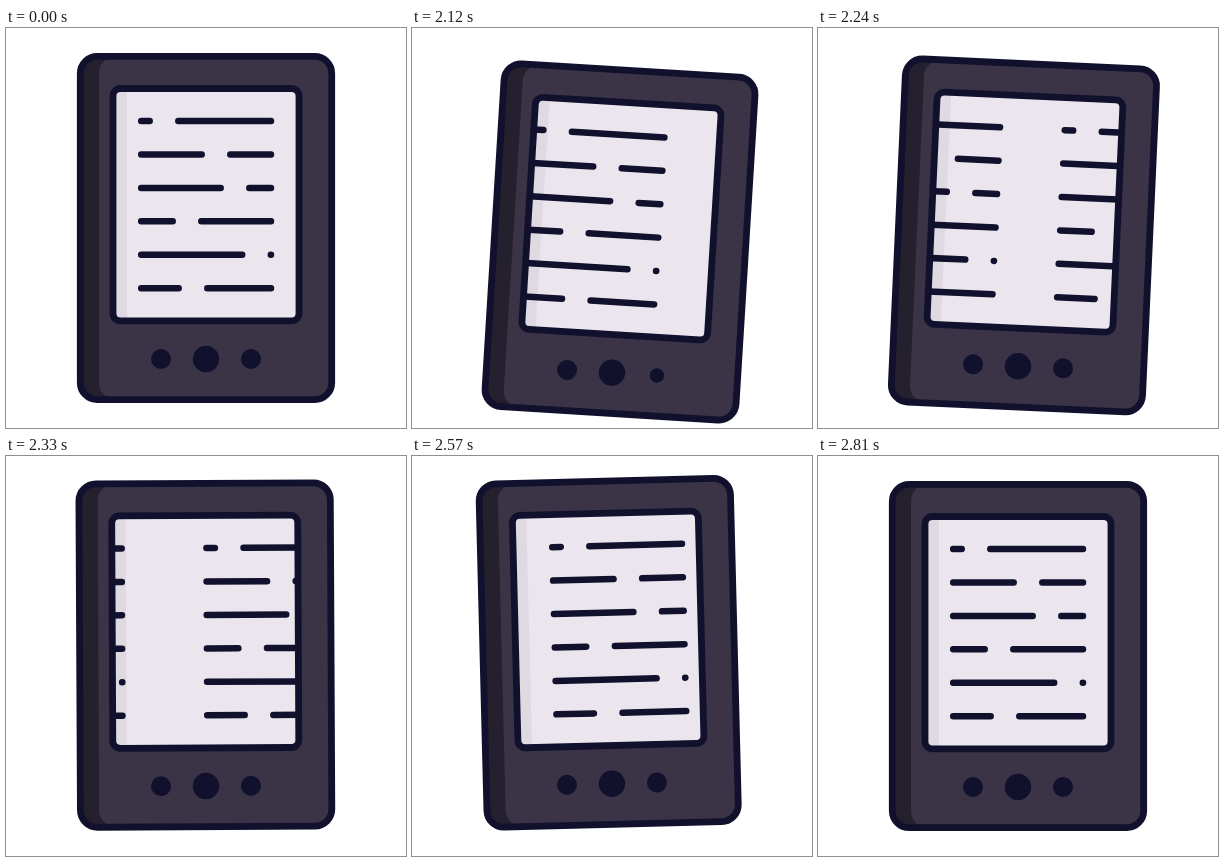
An HTML page that plays this animation: 400 by 400 pixels, repeating every 2.84 s.

```html
<!DOCTYPE html>
<html lang="en">
<head>
<meta charset="utf-8">
<title>E-reader page turn</title>
<style>
  html, body { margin: 0; width: 100%; height: 100%; overflow: hidden; background: #fff; }
  svg { display: block; width: 100%; height: 100%; }
  .ink { fill: #11112e; }
  .line { fill: none; stroke: #11112e; stroke-width: 6.5; stroke-linecap: round; }
  .frame { stroke-width: 6.8; }
</style>
</head>
<body>
<svg viewBox="0 0 400 400">
  <clipPath id="screen"><rect x="107" y="60.5" width="186" height="232.4" rx="7.5"/></clipPath>
  <g id="device">
    <rect x="74.3" y="28.3" width="251.4" height="343.4" rx="17" fill="#25202e"/>
    <rect x="93" y="28.3" width="232.7" height="343.4" rx="17" fill="#3a3446"/>
    <rect class="line frame" x="74.3" y="28.3" width="251.4" height="343.4" rx="17"/>
    <g clip-path="url(#screen)">
      <path d="M107 60h186v234H107z" fill="#ebe6ee"/>
      <path d="M107 60h14v234h-14z" fill="#dfd9e2"/>
      <path id="oldPage" class="line"/>
      <path id="newPage" class="line"/>
    </g>
    <rect class="line frame" x="107" y="60.5" width="186" height="232.4" rx="7.5"/>
    <circle class="ink" cx="155" cy="331" r="10"/>
    <circle class="ink" cx="200" cy="331" r="13.2"/>
    <circle class="ink" id="button" cx="245" cy="331" r="10"/>
  </g>
</svg>
<script>
const LOOP = 2840, START = 2000, STEP = 30;
const $ = id => document.getElementById(id);

// Progress 0..1 of t between two times; a power below 1 starts faster.
const part = (t, from, to) => Math.min(1, Math.max(0, (t - from) / (to - from)));
const ease = (t, from, to, power = 1) =>
  (1 - Math.cos(Math.PI * part(t, from, to) ** power)) / 2;

// Two rows of ink per line, parted by a gap after each given x.
const text = [147, 199, 218, 170, 239.5, 176].map((end, i) => {
  const y = 93 + i * 33.45;
  return `M135.2 ${y}H${end - 3.3}M${end + 25.3} ${y}H265`;
}).join("");
$("oldPage").setAttribute("d", text);
$("newPage").setAttribute("d", text);

function draw(now) {
  const t = Math.floor((now % LOOP - START) / STEP) * STEP;

  // The tap pushes the device down and tilts it; it swings past rest and settles.
  const angle = 4 * ease(t, 0, 155) - 6 * ease(t, 155, 435, .95) + 2 * ease(t, 435, 815);
  const drop = 14.3 * ease(t, 0, 145, .75) - 19 * ease(t, 145, 430, .8) + 4.7 * ease(t, 430, 810);
  const press = 3.7 * (ease(t, 0, 70, .75) - ease(t, 70, 220));

  const oldX = -200 * ease(t, 0, 500);
  const newX = t < 0 ? 200 : 200 * (1 - part(t, 50, 760)) ** 2.2;

  $("device").setAttribute("transform", `translate(0 ${drop}) rotate(${angle} 200 331)`);
  $("button").setAttribute("r", 10 - press);
  $("oldPage").setAttribute("transform", `translate(${oldX})`);
  $("newPage").setAttribute("transform", `translate(${newX})`);
}

const begin = performance.now();
function tick() {
  draw(performance.now() - begin);
  requestAnimationFrame(tick);
}
tick();
</script>
</body>
</html>
```
